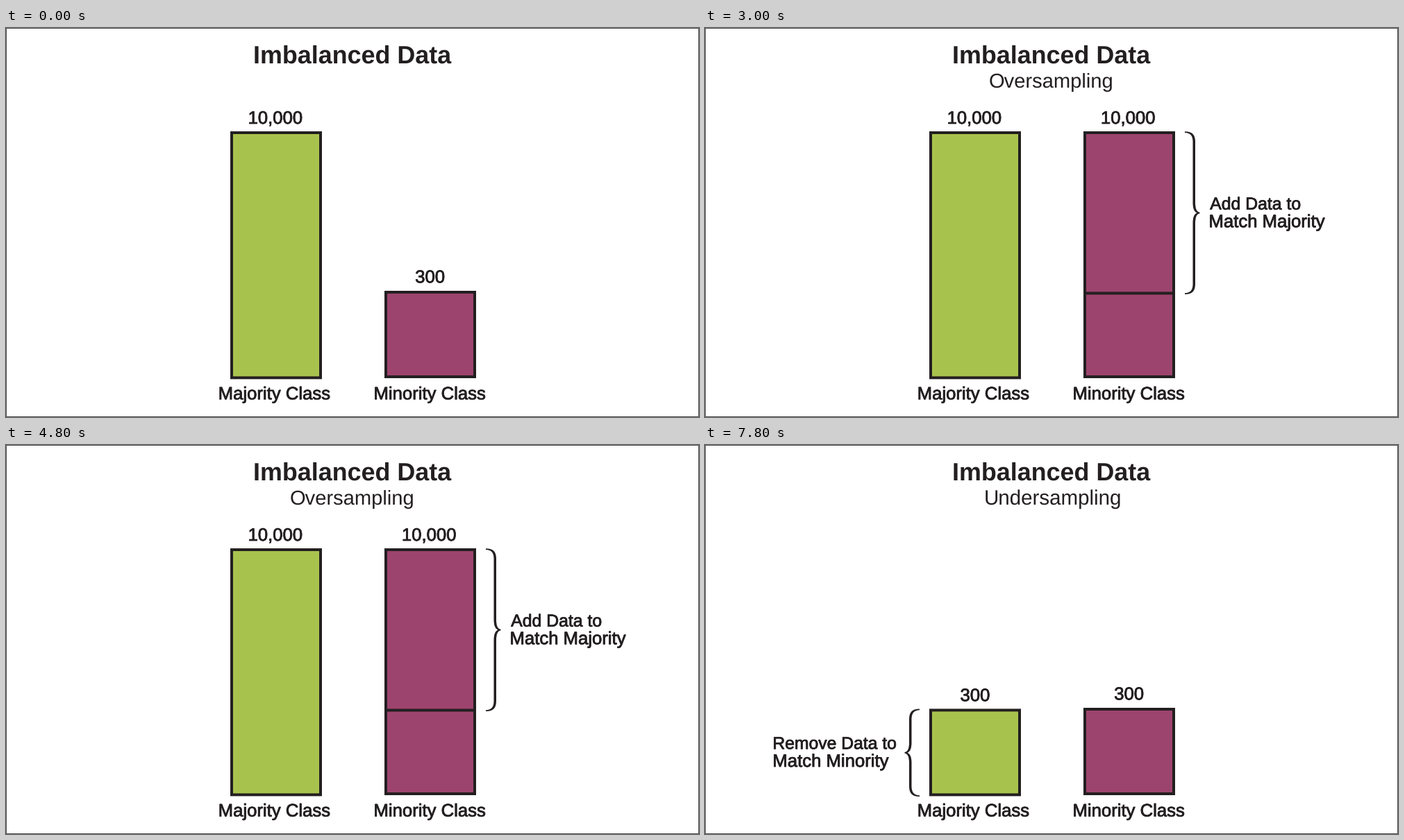
A matplotlib script for the animation above (9000 ms loop, 998 by 561 pixels).

```python
import matplotlib.pyplot as plt
from matplotlib.animation import FuncAnimation
from matplotlib.patches import PathPatch, Rectangle
from matplotlib.path import Path
from matplotlib.patheffects import withStroke

W, H, DPI = 998, 561, 64
PT = 72 / DPI  # points per pixel
INK, GREEN, PURPLE = "#231f20", "#a8c34d", "#9c446e"
BORDER = "#4d4d4d"

plt.rcParams["font.family"] = "Liberation Sans"
plt.rcParams["text.hinting"] = "none"

fig = plt.figure(figsize=(W / DPI, H / DPI), dpi=DPI, facecolor="white")
ax = fig.add_axes([0, 0, 1, 1])


def write(x, y, text, size=25.7, weight="normal", stroke=0.0):
    """Text with its pen origin at x and its baseline at y."""
    label = ax.text(x, y, text, fontsize=size * PT, weight=weight, color=INK,
                    ha="left", va="baseline")
    if stroke:
        label.set_path_effects([withStroke(linewidth=stroke * PT, foreground=INK)])


def medium(x, y, text, size=25.7):
    write(x, y, text, size, stroke=0.8)


def bar(x, top, bottom, color):
    ax.add_patch(Rectangle((x, top), 128, bottom - top, facecolor=color,
                           edgecolor=INK, linewidth=4 * PT, snap=False))


def brace(x, top, bottom, side):
    """Curly brace with its ends at x, pointing right (side=1) or left (-1)."""
    mid = (top + bottom) / 2
    half = mid - top
    outer = [(0, 0), (9, 0), (15, 3), (15, 15), (15, half - 15),
             (15, half - 6), (17, half - 1.5), (21.5, half - 0.8)]
    inner = [(0, 1.7), (7, 2), (11.5, 5), (11.5, 15), (11.5, half - 15),
             (11.5, half - 7), (13, half - 2), (17.5, half)]

    def mirror(points):
        return [(u, 2 * half - v) for u, v in reversed(points)]

    outline = outer + mirror(outer) + mirror(inner)[:0]
    outline += inner_back(inner, half)
    curve = [Path.CURVE4] * 3 + [Path.LINETO] + [Path.CURVE4] * 3
    codes = [Path.MOVETO] + curve + ([Path.LINETO] + curve) * 3
    points = [(x + side * u, top + v) for u, v in outline]
    ax.add_patch(PathPatch(Path(points, codes), facecolor=INK, linewidth=0))


def inner_back(inner, half):
    """Inner edge from the lower end back up to the upper end."""
    lower = [(u, 2 * half - v) for u, v in inner]
    return lower + inner[::-1]


def majority(top, count, x, baseline):
    bar(325, top, 504.4, GREEN)
    medium(x, baseline, count)


def minority(top, count, x, baseline):
    bar(547, top, 503, PURPLE)
    medium(x, baseline, count)


def imbalanced():
    majority(151, "10,000", 348.5, 138)
    minority(381, "300", 589.2, 367.3)


def oversampling():
    write(409, 86, "Oversampling", 29.1)
    majority(151, "10,000", 348.5, 138)
    minority(151, "10,000", 569.9, 138)
    ax.plot([547, 675], [382.5] * 2, color=INK, linewidth=4 * PT,
            solid_capstyle="butt", snap=False)
    brace(691, 149.3, 384, 1)
    medium(727.2, 261.7, "Add Data to", 24.8)
    medium(725.5, 287.3, "Match Majority")


def undersampling():
    write(401.8, 86, "Undersampling", 29.5)
    majority(382.4, "300", 367.5, 369.3)
    minority(381, "300", 589.2, 367.3)
    brace(309, 380.6, 507, -1)
    medium(97.4, 438.3, "Remove Data to", 24.7)
    medium(97.4, 464, "Match Minority")


SCENES = [imbalanced, oversampling, undersampling]


def draw(i):
    ax.clear()
    ax.set(xlim=(0, W), ylim=(H, 0))
    ax.axis("off")
    ax.add_patch(Rectangle((0.5, 0.5), W - 1, H - 1, fill=False,
                           edgecolor=BORDER, linewidth=PT, snap=False))
    write(355.7, 51, "Imbalanced Data", 35.9, "bold")
    medium(305.7, 535.6, "Majority Class")
    medium(529.5, 535.6, "Minority Class")
    SCENES[i]()
    return []


anim = FuncAnimation(fig, draw, frames=len(SCENES), interval=3000,
                     init_func=lambda: [], repeat=True, repeat_delay=0)
plt.show()
```
